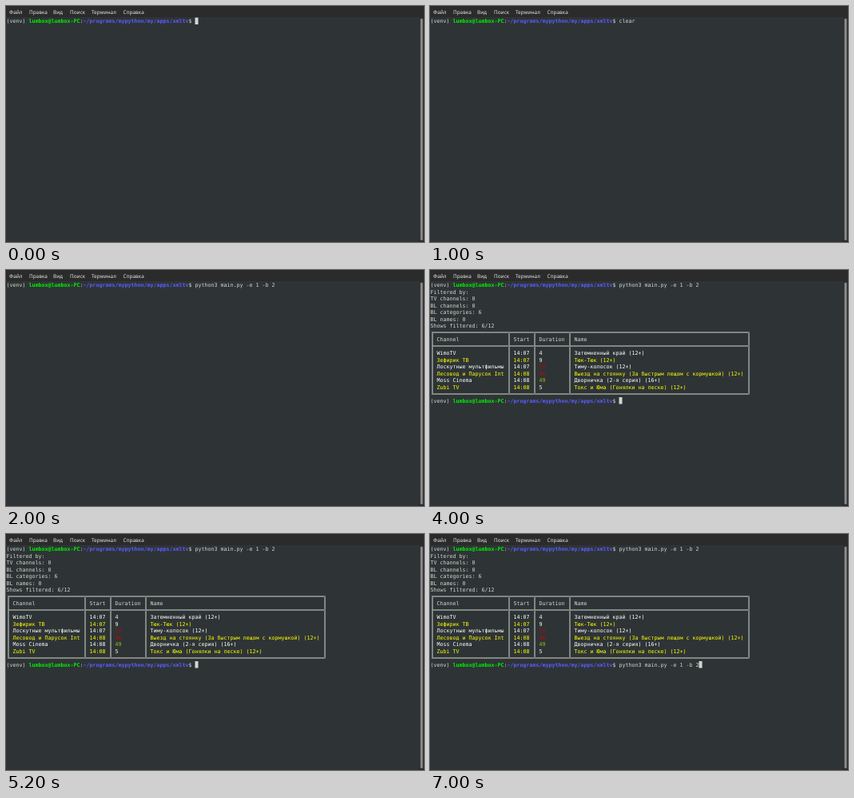
These frames come from a looping animation (523 by 295 pixels, 8 s). An HTML page:

```html
<!DOCTYPE html>
<html lang="ru">
<head>
<meta charset="utf-8">
<title>Terminal</title>
<style>
html, body { margin: 0; width: 100%; height: 100%; overflow: hidden; background: #2e3436; }
svg { display: block; width: 100vw; height: 100vh; }
text { white-space: pre; text-rendering: geometricPrecision; }
.menu text { font: 12.8px "Noto Sans", sans-serif; fill: #e6e6e6; }
.term text { font: 13.29px "DejaVu Sans Mono", monospace; fill: #d3d7cf; }
.term .bold { font-weight: bold; }
.cursor { fill: #d3d7cf; }
.table { fill: none; stroke: #d3d7cf; }
.step { visibility: hidden; animation: 8s step-end infinite; }
#cursor1 { animation-name: start; }
#clear { animation-name: clear; }
#command { animation-name: command; }
#output { animation-name: output; }
#cursor2 { animation-name: blink; }
#again { animation-name: again; }
@keyframes start { 0% { visibility: visible } 12.5%, 100% { visibility: hidden } }
@keyframes clear { 0% { visibility: hidden } 12.5% { visibility: visible } 25%, 100% { visibility: hidden } }
@keyframes command { 0% { visibility: hidden } 25%, 100% { visibility: visible } }
@keyframes output { 0% { visibility: hidden } 50%, 100% { visibility: visible } }
@keyframes blink { 0% { visibility: hidden } 50% { visibility: visible } 75%, 100% { visibility: hidden } }
@keyframes again { 0% { visibility: hidden } 87.5%, 100% { visibility: visible } }
</style>
</head>
<body>
<svg id="stage" viewBox="0 0 1046 590" preserveAspectRatio="none"></svg>
<script>
// Layout is in half pixels: one character cell is 8 by 17.
const cellW = 8, cellH = 17, left = 1, top0 = 29;
const white = '#fff', yellow = '#ff0', red = '#cd0000', olive = '#a5b414';

const text = (col, row, str, color = '', cls = '') =>
  `<text x="${left + col * cellW}" y="${top0 + row * cellH + 13}" class="${cls}"` +
  `${color && ` style="fill:${color}"`}>${str}</text>`;
const rect = (x, y, w, h, attrs) =>
  `<rect x="${x}" y="${y}" width="${w}" height="${h}" ${attrs}/>`;
const cursor = (col, row) =>
  rect(left + col * cellW, top0 + row * cellH, cellW, cellH, 'class="cursor"');
const step = (id, body) => `<g id="${id}" class="step">${body}</g>`;

const prompt = row =>
  text(0, row, '(venv)') +
  text(7, row, 'lumbox@lumbox-PC', '#00f000', 'bold') +
  text(23, row, ':') +
  text(24, row, '~/programs/mypython/my/apps/xmltv', '#5c5cff', 'bold') +
  text(57, row, '$');

const menu = [[8, 'Файл'], [58, 'Правка'], [118, 'Вид'], [160, 'Поиск'], [214, 'Терминал'], [293, 'Справка']]
  .map(([x, label]) => `<text x="${x}" y="19">${label}</text>`).join('');

const summary = ['Filtered by:', 'TV channels: 0', 'BL channels: 0', 'BL categories: 6',
  'BL names: 0', 'Shows filtered: 6/12'].map((s, i) => text(0, i + 1, s)).join('');

// Double rules: an outer frame and a separate frame for each cell.
const bars = [0, 24, 32, 43, 99], rules = [7, 9, 16];
const barX = c => left + c * cellW + 4.5;
const ruleY = r => top0 + r * cellH + 8.5;
const frame = (c1, r1, c2, r2, inset) => {
  const x = barX(c1) + inset, y = ruleY(r1) + inset;
  return rect(x, y, barX(c2) - inset - x, ruleY(r2) - inset - y, 'class="table"');
};
let table = frame(0, 7, 99, 16, -1);
for (let r = 0; r < 2; r++)
  for (let c = 0; c < 4; c++)
    table += frame(bars[c], rules[r], bars[c + 1], rules[r + 1], 1);

['Channel', 'Start', 'Duration', 'Name'].forEach((s, c) => table += text(bars[c] + 2, 8, s));
const shows = [
  ['WimoTV', '14:07', '4', 'Затемненный край (12+)'],
  ['Зефирик ТВ', '14:07', '9', 'Тюк-Тюк (12+)'],
  ['Лоскутные мультфильмы', '14:07', '17', 'Тиму-колосок (12+)', red],
  ['Лесовод и Парусок Int', '14:08', '26', 'Выезд на стоянку (За быстрым лещом с кормушкой) (12+)', red],
  ['Moss Cinema', '14:08', '49', 'Дворничка (2-я серия) (16+)', olive],
  ['Zubi TV', '14:08', '5', 'Токс и Юма (Гонялки на песке) (12+)'],
];
shows.forEach((show, i) => {
  const tint = i % 2 ? yellow : white;
  for (let c = 0; c < 4; c++)
    table += text(bars[c] + 2, 10 + i, show[c], c === 2 ? show[4] || white : tint);
});

const run = 'python3 main.py -e 1 -b 2';
document.getElementById('stage').innerHTML =
  rect(0, 0, 1046, 590, 'fill="#2e3436"') +
  rect(0, 0, 1046, 28, 'fill="#2b2b2b"') +
  rect(1035, 28, 11, 562, 'fill="#2b2b2b"') +
  rect(1037, 31, 6, 555, 'rx="3" fill="#8b8c8c"') +
  `<g class="menu">${menu}</g><g class="term">` +
  prompt(0) +
  step('cursor1', cursor(59, 0)) +
  step('clear', text(59, 0, 'clear')) +
  step('command', text(59, 0, run)) +
  step('output', summary + table + prompt(17)) +
  step('cursor2', cursor(59, 17)) +
  step('again', text(59, 17, run) + cursor(84, 17)) +
  '</g>';
</script>
</body>
</html>
```
